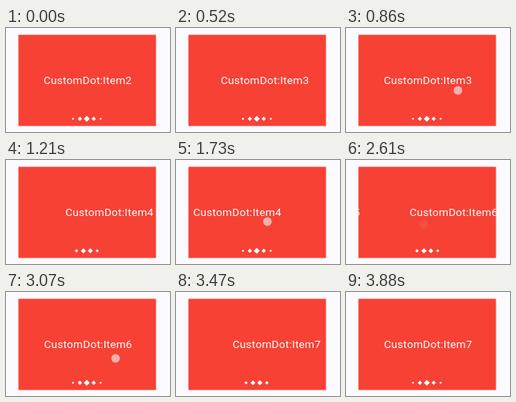
Animation, 205 px wide and 130 px high, one loop 3.9 s. Source, as an HTML page:

```html
<!DOCTYPE html>
<html lang="en">
<head>
<meta charset="utf-8">
<title>Carousel with custom dots</title>
<style>
  html, body { margin: 0; height: 100%; overflow: hidden; background: #fbfbff; }
  svg { display: block; width: 100%; height: 100%; }
  text { font: 13.6px Roboto, sans-serif; letter-spacing: .243px; text-anchor: middle; fill: #fff; }
</style>
</head>
<body>
<svg viewBox="0 0 205 130">
  <clipPath id="card"><rect x="15.5" y="8.5" width="172" height="114"/></clipPath>
  <rect x="15.5" y="8.5" width="172" height="114" fill="#f74135"/>
  <g id="pages" clip-path="url(#card)"></g>
  <path id="dots" fill="#fff"/>
  <circle id="touch" r="5.4" fill="#eee"/>
</svg>
<script>
const LOOP = 3900, PAGE = 172, FIRST = 2, LAST = 7;
const DRAG = 150, DRAGGED = 0.25;
// Each swipe: release time, then where the finger lands
const swipes = [
  [192, 140, 78], [1005, 140, 78], [1765, 140, 77], [2425, 140, 80], [3250, 137, 83]
];
const $ = id => document.getElementById(id);
const clamp = v => Math.min(1, Math.max(0, v));

const labels = [];
for (let i = FIRST; i <= LAST; i++) {
  const label = document.createElementNS('http://www.w3.org/2000/svg', 'text');
  label.textContent = 'CustomDot:Item' + i;
  label.setAttribute('y', 70.3);
  $('pages').append(label);
  labels.push(label);
}

const dragAt = t => DRAGGED * clamp(1 + t / DRAG) ** 2;

// Finger drag, then an overdamped spring to the next page
function travel(t) {
  if (t < 0) return dragAt(t);
  const s = t / 1000;
  return 1 - 1.044 * Math.exp(-9.07 * s) + 0.294 * Math.exp(-22 * s);
}

function diamond(distance) {
  const d = Math.abs(distance);
  const r = Math.min(3.7 - 1.05 * d, (2.5 - d) * 3);
  if (r <= 0) return '';
  return `M${101 + distance * 8.65} ${113.5 - r}l${r} ${r}l${-r} ${r}l${-r} ${-r}z`;
}

function draw(time) {
  let page = 0, selected = 0, opacity = 0;
  for (const [release, x, y] of swipes) {
    const t = time - release;
    page += travel(t);
    selected += clamp((t - 85) / 245);
    if (t > -190 && t < 210) {
      opacity = 0.65 * (1 - clamp(t / 210));
      $('touch').setAttribute('cx', x - dragAt(t) * PAGE);
      $('touch').setAttribute('cy', y);
    }
  }
  $('touch').setAttribute('opacity', opacity);
  labels.forEach((label, i) => label.setAttribute('x', 102.1 + (i - page) * PAGE));
  let path = '';
  for (let i = -2; i <= LAST; i++) path += diamond(i - selected);
  $('dots').setAttribute('d', path);
}

const start = performance.now();
function frame() {
  draw((performance.now() - start) % LOOP);
  requestAnimationFrame(frame);
}
frame();
</script>
</body>
</html>
```
